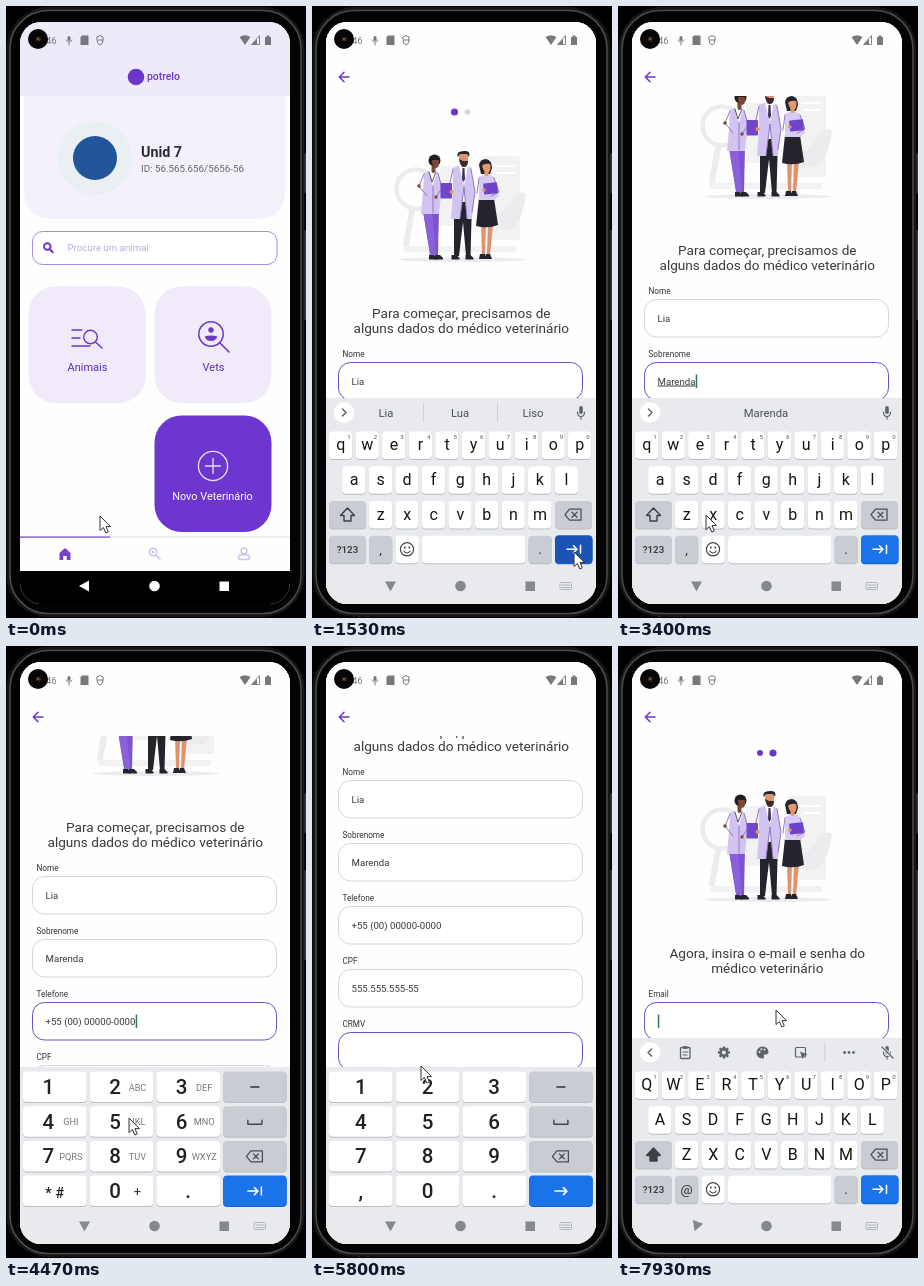
These frames come from a looping animation (300 px wide and 612 px high, 8 s). An HTML page:

```html
<!DOCTYPE html>
<html lang="pt-BR">
<head>
<meta charset="utf-8">
<title>Cadastro</title>
<style>
html, body { margin: 0; width: 100%; height: 100%; overflow: hidden; background: #000; }
svg { display: block; width: 300px; height: 612px; font-family: Roboto, sans-serif; }
text { white-space: pre; }
</style>
</head>
<body>
<svg id="stage" viewBox="0 0 300 612"></svg>
<script>
const PURPLE = '#6a37cb', GREY = '#5f6368', KEY = '#c9cdd3', BLUE = '#1a73e8', KB = '#e8eaed';

// Drawing helpers, each returns markup
const R = (x, y, w, h, r, fill, more = '') =>
  `<rect x="${x}" y="${y}" width="${w}" height="${h}" rx="${r}" fill="${fill}" ${more}/>`;
const C = (x, y, r, fill, more = '') => `<circle cx="${x}" cy="${y}" r="${r}" fill="${fill}" ${more}/>`;
const L = (d, stroke, w = 1.2, fill = 'none') =>
  `<path d="${d}" stroke="${stroke}" stroke-width="${w}" fill="${fill}" stroke-linecap="round" stroke-linejoin="round"/>`;
const F = (d, fill) => `<path d="${d}" fill="${fill}"/>`;
const T = (x, y, size, str, fill, more = '') =>
  `<text x="${x}" y="${y}" font-size="${size}" fill="${fill}" ${more}>${str}</text>`;
const M = (x, y, size, str, fill, more = '') => T(x, y, size, str, fill, 'text-anchor="middle" ' + more);
const G = (id, body, more = '') => `<g id="${id}" ${more}>${body}</g>`;
const ring = (x, y, r, stroke, w) => C(x, y, r, 'none', `stroke="${stroke}" stroke-width="${w}"`);

function phoneBody() {
  return R(0, 0, 300, 612, 0, '#000') + R(297, 147, 3, 40, 1, '#3a3a3c') + R(297, 224, 3, 90, 1, '#3a3a3c') +
    R(0.5, 1, 298, 610, 42, '#161617') +
    R(4, 4.5, 291, 603, 38, '#030303', 'stroke="#4a4a4d" stroke-width="1.6"');
}

function statusBar() {
  const g = '#77777c';
  return T(40, 38, 9.5, '46', g) +
    R(61.5, 30, 3, 5, 1.5, g) + L('M60 34Q63 39 66 34M63 37V39', g, 0.9) +
    F('M76 29.5H82.5V39H74.5V31Z', g) +
    L('M91 31L94 29.5L97 31V34Q97 38 94 39Q91 38 91 34ZM92 34H97', g, 1) +
    F('M233.5 31Q239 27.5 244.500 31L239 39Z', g) +
    L('M246 38.500H253.500V30Z', g, 0.9) + F('M246 38.500H251V33Z', g) +
    F('M259 31H260.500V29.500H263.500V31H265V39H259Z', g) +
    C(32, 33, 10, '#050505') + C(32.5, 33, 2.6, '#33251d') + C(32, 33, 1, '#8a6a3c');
}

function home() {
  const tile = (x, y, fill, label, ink) => R(x, y, 117, 116.5, 27, fill) + M(x + 59, y + 84.5, 11, label, ink);
  const pale = '#cfc2ee';
  return R(14, 16, 270, 582, 0, '#fefefe') + R(14, 16, 270, 74, 0, '#efeaf9') +
    F('M18 90H279V184Q279 213 250 213H47Q18 213 18 184Z', '#f4f1fb') +
    C(130, 71, 8.3, PURPLE) + T(141, 74, 10.4, 'potrelo', PURPLE, 'font-weight="500"') +
    C(89, 152, 37, '#eaeff3') + C(89, 152, 22, '#22559a') +
    T(135, 151, 14.3, 'Unid 7', '#2d2a36', 'font-weight="700"') +
    T(135, 166, 9.8, 'ID: 56.565.656/5656-56', '#66636e') +
    R(26.5, 225.5, 244.5, 33, 10, '#fff', 'stroke="#a78cdf"') +
    ring(41.3, 240.500, 3.3, PURPLE, 1.9) + L('M44 243.500L46.800 246.300', PURPLE, 2) +
    T(61.5, 245, 9.7, 'Procure um animal', '#bba8e6') +
    tile(22.5, 280.5, '#f0eaf9', 'Animais', '#5a2fba') +
    L('M66 324H76M66 332H74M66 340H84', PURPLE, 1.4) + ring(84.5, 331, 6.8, PURPLE, 1.4) + L('M89.500 336L96 342', PURPLE, 1.5) +
    tile(148.5, 280.5, '#f0eaf9', 'Vets', '#5a2fba') +
    ring(205, 328, 12.2, PURPLE, 1.5) + L('M214 337L223 346', PURPLE, 1.6) +
    C(205, 324, 2.7, PURPLE) + F('M198.500 330.500Q205 328.500 211.500 330.500Q209.500 335 205 335Q200.500 335 198.500 330.500Z', PURPLE) +
    G('newVet', R(148.5, 409.5, 117, 116.5, 27, '#6d37cf') + ring(207, 460, 14.6, '#e9e0fb', 1.3) +
      L('M199.500 460H214.500M207 452.500V467.500', '#e9e0fb', 1.3) +
      M(206.5, 494, 10.9, 'Novo Veterinário', '#fff')) +
    R(14, 530.5, 270, 1, 0, '#e4e0ea') + R(14, 530.5, 90, 1.2, 0, '#7b4ac6') +
    F('M53.500 547L59 542L64.500 547V554H60.800V550H57.200V554H53.500Z', '#7442c8') +
    ring(147, 546, 3.8, pale, 1.6) + C(147, 546, 1.6, pale) + L('M150 549L154 553', pale, 1.7) +
    ring(238, 545, 2.9, pale, 1.5) + R(232.5, 549, 11, 4.5, 2, 'none', `stroke="${pale}" stroke-width="1.5"`);
}

function people() {
  const bg = '#f2f2f3', bg2 = '#ececee', coat = '#d2c4f1', edge = '#8f78c8', dark = '#24242d';
  const brown = '#7b4738', skin = '#dd9270';
  const shoe = x => F(`M${x} 249h5l3 3v1.500h-8z`, dark);
  return `<ellipse cx="150" cy="253.500" rx="63" ry="2.500" fill="${bg2}"/>` +
    R(170, 150, 38, 84, 2, bg) + F('M184 208Q196 205 200 191Q208 184 214 188Q211 214 198 224H184Z', bg2) + R(128, 160, 32, 60, 3, bg) +
    L('M184 160H202M186 167H202', '#fff', 2) +
    ring(104, 183, 19.5, bg2, 4.5) + L('M100 205L94 238', bg2, 6) + R(92, 240, 112, 6, 1, bg) +
    // left figure
    F('M111 205H127L126 249H121L117 215L123 249H118Z', '#7c54d2') + F('M111 205H120L124 249H118.500Z', '#8961db') +
    shoe(117) + shoe(123) +
    F('M112 167Q119 163 126 167L130 181L127 208H109L111 186Z', coat) + F('M117 165H125L121 180Z', '#fff') +
    L('M112 168L107 180L115 190M126 167L130 182L124 191M121 180V207', edge, 1) + L('M117 166L120 176L124 166', '#4b4560', 0.9) +
    R(119.5, 159, 4, 8, 2, brown) + C(122.5, 154.500, 6, '#231c22') + F('M120 154H127Q128 162 123.500 162Q120 161 120 154Z', brown) +
    C(107, 180, 1.8, brown) + C(124, 191, 1.7, brown) +
    // middle figure
    F('M142 196H160L158.500 250H154L151 216L147 250H142Z', dark) + shoe(139.5) + shoe(153.5) +
    F('M141 162Q150 157 159 162L163 185L160 213H155L152 182L148 213H139L141 186Z', coat) + F('M147 160H156L152 179Z', '#fff') +
    F('M150.500 162H152.500L153 173L151.500 176L150 173Z', '#3b3350') +
    L('M141 163L137 181M159 163L163 186L160 206M148 212L152 181L155 212', edge, 1) +
    R(149, 154, 5, 7, 2, skin) + F('M146.500 148H156Q157 159 151.500 160Q147 159 146.500 148Z', skin) +
    F('M145.500 151Q144 145 152 145Q159 144 157 151L155 148H148Z', dark) + F('M147 153L151 155H156Q156 161 151.500 161Q148 160 147 153Z', '#3a2a2d') +
    R(128.5, 177, 11.5, 15.5, 1, '#7047cb') + C(139.5, 186, 2, skin) +
    // right figure
    F('M169 218H174L173 249H170ZM176 218H181L178 249H175Z', skin) + F('M167 192H182L186 219Q176 223 164 220Z', dark) +
    F('M168 248L173 248L174 253H167ZM174 248H178L180 253H173Z', dark) +
    F('M167 171Q175 166 182 171L187 190L182 194H167Z', '#d8caf3') + L('M182 172L187 186L179 190M167 172L165 187', edge, 1) +
    F('M167 159Q168 153 174 153Q180 154 180 162L178 168H169Z', dark) + R(172.5, 163, 4, 7, 2, '#e39a66') +
    F('M170 157H178Q180 166 175 167Q170 165 170 157Z', '#e39a66') + F('M169 158Q172 153 178 157V158Q173 157 169 160Z', dark) +
    R(171.5, 177, 14, 11, 1, '#6d43ca', 'transform="rotate(-6 178 182)"') + C(172, 184, 1.8, skin);
}

// label, text, typing start and end, focus start and end, caret phase
const fields = [
  ['Nome', 'Lia', 1000, 1300, 600, 1600, 900],
  ['Sobrenome', 'Marenda', 2050, 3250, 1600, 3540, 1950],
  ['Telefone', '+55 (00) 00000-0000', 3720, 4400, 3540, 4560, 4000],
  ['CPF', '555.555.555-55', 4720, 5220, 4560, 5290, 4800],
  ['CRMV', '5', 6670, 6670, 5290, 7400, 5290],
  ['Email', '', 9000, 9000, 7720, 9000, 7720],
  ['Senha', '', 9000, 9000, 9000, 9000, 0]
];
const fieldBox = (i, row) => T(30.5, 350.8 + 63 * row, 8.2, fields[i][0], '#35333b') +
  R(26.5, 356.5 + 63 * row, 244, 37.5, 12, '#fff', `id="box${i}"`) +
  T(39.5, 378.5 + 63 * row, 9.65, '', '#3a3a3f', `id="val${i}"`) +
  R(40, 368.5 + 63 * row, 1.5, 13.5, 0, '#2a7a62', `id="caret${i}"`);
const heading = (a, b) => M(149.3, 311.7, 13.6, a, '#3a393f') + M(149.3, 327.2, 13.6, b, '#3a393f');

function form() {
  return R(14, 16, 270, 582, 0, '#fefefe') +
    L('M37 71H27.500M32 66.300L27.300 71L32 75.700', PURPLE, 1.5) +
    `<g clip-path="url(#body)">` +
    G('page1', C(142.5, 106, 3.6, PURPLE) + C(155.5, 106, 2.8, '#d9d5e0') + people() +
      heading('Para começar, precisamos de', 'alguns dados do médico veterinário') +
      [0, 1, 2, 3, 4].map(i => fieldBox(i, i)).join('')) +
    G('page2', C(142, 107, 3, PURPLE, 'id="dotA"') + C(155, 107, 3.6, PURPLE, 'id="dotB"') + people() +
      heading('Agora, insira o e-mail e senha do', 'médico veterinário') + fieldBox(5, 0) + fieldBox(6, 1)) +
    '</g>';
}

const key = (x, y, w, h, fill, more = '') =>
  R(x, y + 1, w, h, 4, fill === BLUE ? '#1763cb' : '#b9bdc3') + R(x, y, w, h, 4, fill, more);
const tab = (x, y) => L(`M${x - 7} ${y}h10m-3.500 -3.500l3.500 3.500l-3.500 3.500M${x + 6.5} ${y - 4}v8`, '#fff', 1.5);
const backspace = (x, y) => L(`M${x - 8} ${y}l4.500 -5.500h11.500v11h-11.500zM${x - 1} ${y - 2.5}l5 5m0 -5l-5 5`, '#4b4f55', 1.3);
const mic = L('M265.500 406Q265.500 410.500 269 410.500Q272.500 410.500 272.500 406M269 410.500V413', GREY, 1.2) + R(267.2, 400, 3.6, 8, 1.8, GREY);

function letters(id, upper) {
  const rows = ['qwertyuiop', 'asdfghjkl', 'zxcvbnm'], left = [17, 30.2, 56.8];
  let s = '';
  rows.forEach((row, r) => [...row].forEach((ch, i) => {
    const x = left[r] + 26.55 * i, y = 425.5 + 34.7 * r;
    s += key(x, y, 23.3, 27.5, '#fff') +
      M(x + 11.8, y + 18.8, 16, upper ? ch.toUpperCase() : ch, '#151515');
    if (!r) s += M(x + 20, y + 7.5, 6.2, (i + 1) % 10, '#555');
  }));
  return G(id, s + key(17, 495, 37, 27.5, KEY) +
    L('M35.500 502L28.500 509.500H32V515H39V509.500H42.500Z', '#3c4043', 1.4, upper ? '#3c4043' : 'none'));
}

function textKeys() {
  const y = 529.7;
  return letters('lower', false) + letters('upper', true) +
    key(243, 495, 37, 27.5, KEY) + backspace(261, 508.7) +
    key(17, y, 37, 27.5, KEY) + M(35.5, 547.3, 9.8, '?123', '#333', 'font-weight="500"') +
    key(57, y, 23.3, 27.5, KEY) + M(68.6, 548, 13.5, ',', '#333', 'id="comma"') +
    key(83.5, y, 23.3, 27.5, '#fff') + ring(95, 543.3, 6.6, '#444', 1.2) + C(92.8, 541.5, 1, '#444') + C(97.3, 541.5, 1, '#444') +
    L('M91.800 545Q95 549 98.300 545', '#444', 1.1) +
    key(110, y, 103.5, 27.5, '#fff') + key(216.500, y, 23.3, 27.5, KEY) + M(228, 548, 14, '.', '#333') +
    key(243, y - 0.5, 37.5, 28, BLUE, 'id="nextKey"') + tab(262, 543.3);
}

function toolbar() {
  const sep = x => R(x, 397, 0.8, 19, 0, '#c5c8cd');
  const word = (id, x, str) => M(x, 410.5, 11.3, str, '#4c4f55', id && `id="${id}"`);
  const gear = [0, 45, 90, 135].map(a => R(104.600, 400.5, 2.6, 12, 0.5, GREY, `transform="rotate(${a} 105.900 406.500)"`)).join('');
  return C(32, 406.5, 10.2, '#fff') +
    G('words3', word('', 74, 'Lia') + word('', 148, 'Lua') + word('', 221, 'Liso') + sep(111) + sep(185)) +
    G('words1', word('guess', 148, '')) +
    G('fwd', L('M30.500 403L34 406.500L30.500 410', GREY, 1.5)) +
    G('tools', L('M33.500 403L30 406.500L33.500 410', GREY, 1.5) +
      R(62.5, 401.5, 9.5, 11, 1, 'none', `stroke="${GREY}" stroke-width="1.3"`) + R(65, 400, 4.5, 3, 1, GREY) +
      L('M65 406H70M65 409H69', GREY, 1) + gear + C(105.9, 406.5, 4.4, GREY) + C(105.9, 406.5, 2, KB) +
      F('M144.500 400.500Q150.500 401 150.500 406.500Q150 409 146.500 408.500Q145 409 146 411Q146 412.500 144.500 412.500Q138.500 412 138.500 406.500Q139 401 144.500 400.500Z', GREY) +
      C(141.5, 406, 1, KB) + C(143.3, 403.3, 1, KB) + C(146.5, 403.5, 1, KB) +
      R(177.5, 401.5, 10, 9.5, 1, 'none', `stroke="${GREY}" stroke-width="1.2"`) + F('M182 405.500L189.500 408.500L186 410L184.500 413Z', GREY) +
      sep(206.5) + C(226.5, 406.5, 1.4, GREY) + C(231, 406.5, 1.4, GREY) + C(235.5, 406.5, 1.4, GREY)) +
    mic + G('mute', L('M264 401L275 412', KB, 3) + L('M264 401L275 412', GREY, 1.3));
}

function pad(id, phone) {
  const hints = ['', 'ABC', 'DEF', 'GHI', 'JKL', 'MNO', 'PQRS', 'TUV', 'WXYZ'];
  let s = '';
  for (let r = 0; r < 4; r++) for (let c = 0; c < 4; c++) {
    const x = 17 + 66.7 * c, y = 425.5 + 34.7 * r, n = r * 3 + c, mid = x + 31.8;
    const five = !phone && n === 4 && c === 1;
    s += key(x, y, 63.6, 30.5, c < 3 ? '#fff' : r < 3 ? KEY : BLUE, five ? 'id="five"' : '');
    if (c === 3) {
      s += r === 0 ? L(`M${mid - 4} ${y + 15.5}h8`, '#333', 1.6) :
        r === 1 ? L(`M${mid - 7} ${y + 14}v4h14v-4`, '#444', 1.4) :
        r === 2 ? backspace(mid - 0.5, y + 15.5) :
        phone ? tab(mid, y + 15.5) :
        G('padTab', tab(mid, y + 15.5)) + G('padGo', L(`M${mid - 6} ${y + 15.5}h12m-3.500 -3.500l3.500 3.500l-3.500 3.500`, '#fff', 1.5));
    } else {
      const ch = r < 3 ? n + 1 : [phone ? '* #' : ',', '0', '.'][c];
      const off = phone && (r < 3 || c === 1) ? 6.5 : 0;
      s += M(mid - off, y + 22.5, phone && n === 9 ? 14.5 : 20.5, ch, '#202124', 'font-weight="500"');
      if (off) s += M(mid + 16, y + (r < 3 ? 19 : 20.5), r < 3 ? 9.2 : 13, r < 3 ? hints[n] : '+', r < 3 ? '#777' : '#333');
    }
  }
  return G(id, R(14, 421, 270, 178, 0, KB) + s);
}

const cursor = G('cursor', '<path d="M0 0V14.500L3.400 11.500L5.800 17L8.300 15.900L6 10.600H10.500Z" fill="#fff" stroke="#333" stroke-width="1"/>');
document.getElementById('stage').innerHTML =
  `<defs><clipPath id="screen">${R(14, 16, 270, 582, 21, '#000')}</clipPath>` +
  `<clipPath id="body">${R(14, 90, 270, 475, 0, '#000')}</clipPath></defs>` +
  phoneBody() +
  '<g clip-path="url(#screen)">' + G('home', home()) + G('form', form()) +
  `<g clip-path="url(#body)">` +
  G('kb', G('textKb', R(14, 392, 270, 207, 0, KB) + toolbar() + textKeys()) + pad('phonePad', true) + pad('numPad', false)) + '</g>' +
  R(14, 565, 270, 34, 0, '#000', 'id="navBg"') +
  G('nav', '<path id="back" d="M73 580L83 574.500V585.500Z"/><circle cx="148.500" cy="580" r="5.300"/>' +
    '<rect x="213.500" y="575.500" width="9.500" height="9.500"/>') +
  G('switcher', R(248, 576.5, 11.5, 7, 1, 'none', 'stroke="#b4b7ba"') + L('M250 579H258M250 581.500H258', '#b4b7ba', 1)) +
  statusBar() + '</g>' + cursor;

const $ = {};
document.querySelectorAll('[id]').forEach(el => $[el.id] = el);
const set = (id, name, v) => $[id].setAttribute(name, v);
const show = (id, on) => $[id].style.display = on ? '' : 'none';
const move = (id, x, y) => set(id, 'transform', `translate(${x} ${y})`);
const line = (t, a, b) => Math.min(1, Math.max(0, (t - a) / (b - a)));
const ease = (t, a, b) => { const p = line(t, a, b); return p * p * (3 - 2 * p); };
const within = (t, a, b) => t >= a && t < b;

const trail = [
  [70, 94, 510], [260, 203, 476], [850, 203, 476], [1420, 262, 546], [1750, 262, 546], [2500, 88, 509],
  [3500, 88, 509], [3900, 123, 472], [5270, 123, 472], [5700, 109, 420], [6130, 109, 420], [6500, 132, 476],
  [6930, 132, 476], [7140, 247, 543], [7300, 247, 543], [7690, 158, 364]
];
function pointer(t) {
  let i = trail.findIndex(p => p[0] > t);
  if (i < 0) i = trail.length;
  const a = trail[Math.max(0, i - 1)], b = trail[Math.min(i, trail.length - 1)];
  const p = a === b ? 0 : ease(t, a[0], b[0]);
  return [a[1] + (b[1] - a[1]) * p, a[2] + (b[2] - a[2]) * p];
}
function typed(f, t) {
  if (t < f[2]) return '';
  const n = f[1].length;
  return f[2] === f[3] ? f[1] : f[1].slice(0, 1 + Math.floor((n - 1) * line(t, f[2], f[3])));
}

function draw(t) {
  const enter = ease(t, 320, 470);
  set('newVet', 'opacity', within(t, 250, 340) ? 0.6 : 1);
  set('form', 'opacity', enter);
  move('form', 0, 40 * (1 - enter));
  show('form', enter > 0);

  const scroll = 63 * (ease(t, 1600, 1790) + ease(t, 3540, 3730) + ease(t, 4560, 4740)) + 33 * ease(t, 5290, 5460);
  const slide = ease(t, 7400, 7650);
  move('page1', -270 * slide, -scroll);
  move('page2', 270 * (1 - slide), 0);
  const grow = line(t, 7650, 7900);
  set('dotA', 'r', 3.6 - 0.6 * grow);
  set('dotB', 'r', 2.8 + 0.8 * grow);

  fields.forEach((f, i) => {
    const focus = within(t, f[4], f[5]), val = $['val' + i];
    val.textContent = typed(f, t);
    set('box' + i, 'stroke', focus ? '#6c51c6' : '#d6d5db');
    if (i === 1) val.style.textDecoration = focus ? 'underline' : 'none';
    show('caret' + i, focus && (t - f[6] + 8000) % 1000 < 500);
    if (focus) set('caret' + i, 'x', 39.8 + val.getComputedTextLength());
  });

  const up = ease(t, 560, 780) * (1 - ease(t, 7240, 7400)) + ease(t, 7740, 7900);
  const open = up > 0, email = t >= 7400;
  const phone = within(t, 3540, 4580), num = within(t, 4580, 7400);
  const first = within(t, 1000, 1600), second = within(t, 2050, 3540), low = first || second;
  move('kb', 0, 178 * (1 - up));
  show('kb', open);
  show('textKb', !phone && !num);
  show('phonePad', phone);
  show('numPad', num);
  show('lower', low);
  show('upper', !low);
  show('tools', !low);
  show('fwd', low);
  show('words3', first);
  show('words1', second);
  show('mute', email);
  $.guess.textContent = typed(fields[1], t);
  $.comma.textContent = email ? '@' : ',';
  set('nextKey', 'fill', within(t, 1470, 1610) ? '#1c54b6' : BLUE);
  set('five', 'fill', within(t, 6650, 6940) ? '#e2e2e3' : '#fff');
  show('padTab', t < 5290);
  show('padGo', t >= 5290);

  set('navBg', 'fill', open ? KB : '#000');
  set('nav', 'fill', open ? '#85888c' : '#fff');
  show('switcher', open);
  const turn = line(t, 620, 880) * (1 - line(t, 7240, 7400)) + line(t, 7740, 7985);
  set('back', 'transform', `rotate(${-90 * turn} 78.500 580)`);

  const [x, y] = pointer(t);
  move('cursor', x, y);
}

const start = performance.now();
function tick() {
  draw((performance.now() - start) % 8000);
  requestAnimationFrame(tick);
}
tick();
</script>
</body>
</html>
```
